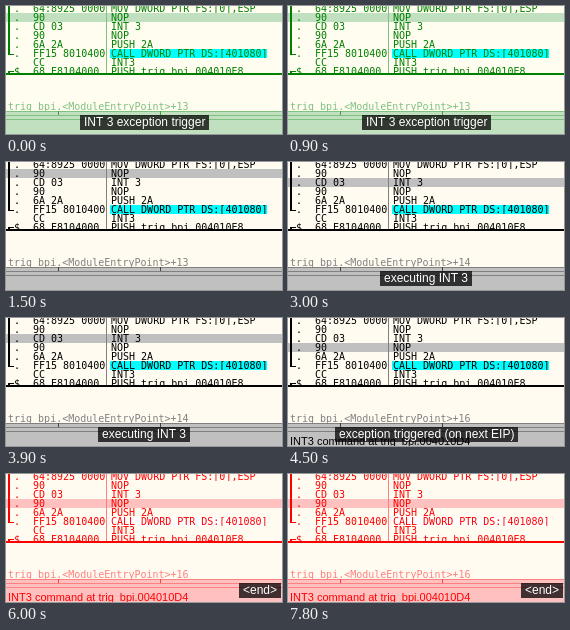
An HTML page with a canvas that plays this animation: 276x128 px, repeating every 9 s.

```html
<!DOCTYPE html>
<html lang="en">
<meta charset="utf-8">
<title>INT 3 debugger trace</title>
<style>
  html, body { margin: 0; width: 100%; height: 100%; overflow: hidden; }
  canvas { display: block; width: 276px; height: 128px; }
</style>
<canvas id="stage" width="276" height="128"></canvas>
<script>
const g = document.getElementById('stage').getContext('2d');
const W = 276, H = 128, ROW = 9, SPLIT = 67;
const MONO = '10px "DejaVu Sans Mono", monospace';
const SANS = '12px "Liberation Sans", Arial, sans-serif';
const SMALL = '11px "Liberation Sans", Arial, sans-serif';
const PAPER = '#fffbf0', FACE = '#c0c0c0', SELECT = '#c0c0c0', SHADE = '#808080';

const code = [
  ['.', '64:8925 00000000', 'MOV DWORD PTR FS:[0],ESP'],
  ['.', '90', 'NOP'],
  ['.', 'CD 03', 'INT 3'],
  ['.', '90', 'NOP'],
  ['.', '6A 2A', 'PUSH 2A'],
  ['.', 'FF15 80104000', 'CALL DWORD PTR DS:[401080]'],
  ['', 'CC', 'INT3'],
  ['$', '68 E8104000', 'PUSH trig_bpi.004010E8']
];

const steps = [
  { until: 1500, row: 1, offset: 13, tint: '#008000', caption: 'INT 3 exception trigger' },
  { until: 3000, row: 1, offset: 13 },
  { until: 4500, row: 2, offset: 14, caption: 'executing INT 3' },
  { until: 6000, row: 3, offset: 16, status: true, caption: 'exception triggered (on next EIP)' },
  { until: 9000, row: 3, offset: 16, status: true, tint: '#ff0000', caption: '<end>', right: true }
];

function box(x, y, w, h, color) {
  g.fillStyle = color;
  g.fillRect(x, y, w, h);
}

function text(str, x, y, font = MONO, color = '#000') {
  g.font = font;
  g.fillStyle = color;
  g.fillText(str, x, y);
}

function drawCode(selected) {
  g.save();
  g.beginPath();
  g.rect(0, 0, W, SPLIT);
  g.clip();
  code.forEach(([mark, hex, command], i) => {
    const top = ROW * i - 2, base = top + 8;
    const back = i === selected ? SELECT : PAPER;
    box(0, top, W, ROW, back);
    text(mark, 8, base);
    text(hex, 27, base);
    // The command column covers the end of long hex strings.
    box(101, top, W - 101, ROW, back);
    if (i === 5) box(104, top, 157, ROW, '#0ff');
    text(command, 105, base);
  });
  box(100, 0, 1, SPLIT, SHADE);
  // Procedure brackets: one ends at the call, the next begins below it.
  box(2, 0, 2, 49, '#000');
  box(2, 48, 6, 1, '#000');
  box(2, 65, 6, 1, '#000');
  box(2, 65, 2, 2, '#000');
  g.restore();
  box(0, SPLIT, W, 2, '#000');
}

function drawPanels(step) {
  text(`trig_bpi.<ModuleEntryPoint>+${step.offset}`, 2, 104, MONO, SHADE);
  box(0, 105, W, H - 105, FACE);
  for (const y of [105, 109, 113]) box(0, y, W, 1, SHADE);
  for (const x of [52, 154]) box(x, 105, 1, 4, '#404040');
  if (step.status) text('INT3 command at trig_bpi.004010D4', 2, 127, SMALL);
}

function drawCaption(str, right) {
  g.font = SANS;
  const w = Math.round(g.measureText(str).width) + 8;
  const x = right ? W - w - 1 : Math.round((W - w) / 2);
  box(x, 109, w, 15, 'rgba(0, 0, 0, .75)');
  text(str, x + 4, 120, SANS, '#fff');
}

function draw(time) {
  const step = steps.find(s => time % 9000 < s.until);
  box(0, 0, W, H, PAPER);
  drawCode(step.row);
  drawPanels(step);
  if (step.tint) {
    g.globalCompositeOperation = 'screen';
    box(0, 0, W, H, step.tint);
    g.globalCompositeOperation = 'source-over';
  }
  if (step.caption) drawCaption(step.caption, step.right);
}

const start = performance.now();
function tick() {
  draw(performance.now() - start);
  requestAnimationFrame(tick);
}
tick();
</script>
</html>
```
